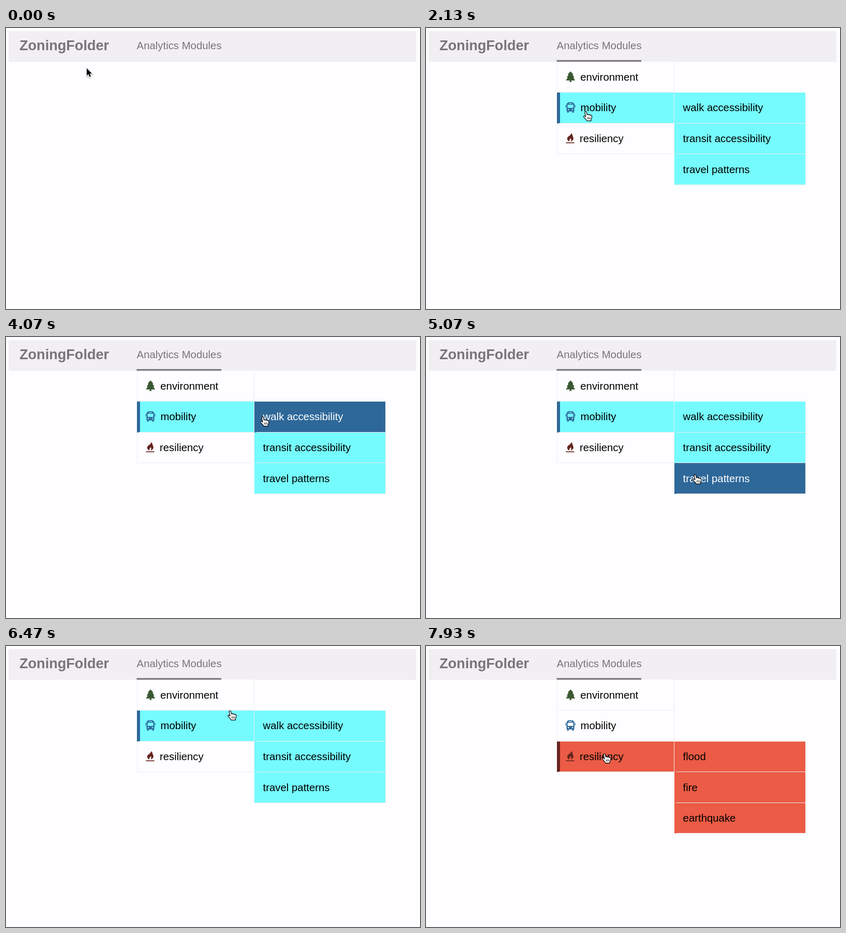
Write an HTML page with a canvas that moves like this. It is 800 px wide and 544 px high and loops after 8 s.

```html
<!DOCTYPE html>
<html lang="en">
<head>
<meta charset="utf-8">
<title>Dropdown menu</title>
<style>
html, body { margin: 0; width: 100%; height: 100%; overflow: hidden; background: #fefdff; }
canvas { display: block; }
</style>
</head>
<body>
<canvas id="stage" width="800" height="544"></canvas>
<script>
const ctx = document.getElementById('stage').getContext('2d');
const LOOP = 8000, STEP = 1000 / 15;
const FONT = '"Liberation Sans", Arial, sans-serif';
const PAGE = '#fefdff', LINE = '#eeecee', GREY = '#777579';
const COL1 = { x: 253, w: 227 }, COL2 = { x: 480, w: 254 };

const modules = [
  { name: 'environment', textX: 298.3, light: '#93e17f', dark: '#3a5831', icon: drawTree,
    subs: ['greenhouse gas', 'protected species'] },
  { name: 'mobility', textX: 298.5, light: '#75fbfd', dark: '#2e6899', icon: drawBus,
    subs: ['walk accessibility', 'transit accessibility', 'travel patterns'] },
  { name: 'resiliency', textX: 296.9, light: '#eb5b45', dark: '#67251f', icon: drawFlame,
    subs: ['flood', 'fire', 'earthquake'] }
];

// Pointer hot spot: time, x, y
const path = [
  [0, 156, 78], [330, 160, 74], [800, 290, 44], [1130, 287, 52], [1330, 284, 72],
  [1750, 300, 100], [2050, 308, 150], [2350, 312, 214], [2600, 306, 205], [2930, 301, 175],
  [3300, 330, 158], [3800, 505, 156], [4070, 496, 155], [4350, 505, 158], [4600, 515, 210],
  [4850, 520, 262], [5150, 520, 268], [5500, 510, 215], [5750, 500, 172], [6000, 491, 161],
  [6300, 440, 150], [6650, 425, 98], [7000, 500, 90], [7200, 519, 89], [7400, 450, 100],
  [7600, 370, 150], [7800, 345, 208], [7930, 345, 209], [8000, 345, 209]
];

const rowTop = i => Math.round(65.4 + 59.6 * i);
const textBase = i => 101.7 + 59.6 * i;

function pointerAt(t) {
  let i = 1;
  while (i < path.length - 1 && path[i][0] < t) i++;
  const [t0, x0, y0] = path[i - 1], [t1, x1, y1] = path[i];
  const u = Math.min(1, Math.max(0, (t - t0) / (t1 - t0)));
  const k = u * u * (3 - 2 * u);
  return { x: x0 + (x1 - x0) * k, y: y0 + (y1 - y0) * k };
}

// Hover state follows from the pointer and the previously open module
function hover(prev, p) {
  const closed = { p, open: false, mod: -1, sub: -1 };
  if (p.y < 65) {
    return p.x >= 252 && p.x <= 416 ? { p, open: true, mod: -1, sub: -1 } : closed;
  }
  if (!prev.open) return closed;
  const row = Math.floor((p.y - 65.4) / 59.6);
  if (p.x >= COL1.x && p.x < COL2.x && row < 3) {
    return { p, open: true, mod: Math.max(0, row), sub: -1 };
  }
  const sub = row - prev.mod;
  if (prev.mod >= 0 && p.x >= COL2.x && sub >= 0 && sub < modules[prev.mod].subs.length) {
    return { p, open: true, mod: prev.mod, sub };
  }
  return closed;
}

const states = [];
for (let i = 0; i < LOOP / STEP; i++) {
  states.push(hover(states[i - 1] || { open: false, mod: -1 }, pointerAt(i * STEP)));
}

function rect(x, y, w, h, color) {
  ctx.fillStyle = color;
  ctx.fillRect(x, y, w, h);
}

function text(str, x, y, color, font) {
  ctx.font = font || '20.35px ' + FONT;
  ctx.fillStyle = color;
  ctx.fillText(str, x, y);
}

function poly(points, color) {
  ctx.beginPath();
  points.forEach(([x, y]) => ctx.lineTo(x, y));
  ctx.closePath();
  ctx.fillStyle = color;
  ctx.fill();
}

function cell(col, row, fill, bar) {
  const y = rowTop(row), h = rowTop(row + 1) - y, { x, w } = col;
  rect(x, y, w, h, LINE);
  rect(x + 1, y, w - 2, h - 1, fill);
  if (bar) poly([[x, y], [x + 6, y], [x + 6, y + h - 1], [x, y + h]], bar);
}

function drawTree(color) {
  const side = [[0, 84], [5.5, 90], [3.8, 90.6], [7.3, 95.4], [5.4, 96], [9, 101.5], [1.3, 101.5], [2.2, 104.5]];
  const left = side.map(([x, y]) => [279.3 - x, y]).reverse();
  poly([...side.map(([x, y]) => [279.3 + x, y]), ...left], color);
}

function drawBus(color) {
  ctx.fillStyle = color;
  ctx.beginPath();
  ctx.roundRect(271.6, 143.8, 15, 17.6, [5, 5, 1.5, 1.5]);
  ctx.rect(276, 145.8, 6.2, 1.2);
  ctx.roundRect(273.6, 148.4, 11, 6.4, 1);
  ctx.rect(275.9 + 1.3, 158, 0, 0);
  for (const x of [275.2, 283]) {
    ctx.moveTo(x + 1.3, 158);
    ctx.arc(x, 158, 1.3, 0, Math.PI * 2);
  }
  ctx.fill('evenodd');
  for (const x of [269.8, 287.2]) rect(x, 148.8, 1.3, 5.2, color);
  for (const x of [272.8, 282.7]) rect(x, 161, 2.8, 3, color);
}

function drawFlame(color) {
  ctx.fillStyle = color;
  ctx.beginPath();
  ctx.moveTo(280.6, 203.6);
  ctx.bezierCurveTo(280.8, 208.4, 272.6, 209.6, 272.8, 214.4);
  ctx.bezierCurveTo(272.9, 217.2, 274.8, 218.7, 277.4, 219.8);
  ctx.bezierCurveTo(276, 216.6, 278.8, 215.6, 279.6, 213.2);
  ctx.bezierCurveTo(280.8, 215, 281, 217.4, 279.8, 219.8);
  ctx.bezierCurveTo(283.2, 218.2, 285.4, 216, 284.8, 212.4);
  ctx.bezierCurveTo(284.4, 210.4, 283.4, 209.4, 283.2, 208.4);
  ctx.bezierCurveTo(282.8, 206.4, 282.4, 204.8, 280.6, 203.6);
  ctx.fill();
  rect(270.4, 221.4, 16.2, 1.7, color);
}

function drawArrow() {
  ctx.beginPath();
  [[0, 0], [0, 14.2], [3.2, 11.2], [5.5, 16.6], [8, 15.5], [5.7, 10.3], [10.2, 10.3]]
    .forEach(([x, y]) => ctx.lineTo(x, y));
  ctx.closePath();
  ctx.save();
  ctx.shadowColor = 'rgba(0,0,0,.35)';
  ctx.shadowBlur = 3;
  ctx.shadowOffsetY = 1.5;
  ctx.strokeStyle = '#fff';
  ctx.lineWidth = 2;
  ctx.stroke();
  ctx.restore();
  ctx.fillStyle = '#000';
  ctx.fill();
}

function drawHand() {
  ctx.beginPath();
  ctx.moveTo(-1.9, 1.2);
  ctx.bezierCurveTo(-1.8, -0.8, 0.8, -1, 1.4, 0.8);
  ctx.lineTo(2.7, 6);
  ctx.bezierCurveTo(3.4, 4.6, 5.5, 4.8, 5.9, 6.4);
  ctx.bezierCurveTo(6.8, 5.2, 8.7, 5.6, 9, 7.2);
  ctx.bezierCurveTo(10, 6.2, 11.6, 6.8, 11.8, 8.4);
  ctx.bezierCurveTo(12.2, 11.4, 11.2, 13, 10.3, 15);
  ctx.lineTo(10.1, 17.6);
  ctx.lineTo(2, 17.6);
  ctx.bezierCurveTo(1.4, 14.8, -2.2, 12.6, -4, 10);
  ctx.bezierCurveTo(-4.8, 8.2, -2.6, 7.4, -1.2, 8.6);
  ctx.lineTo(0, 9.8);
  ctx.closePath();
  ctx.fillStyle = '#fff';
  ctx.fill();
  ctx.strokeStyle = '#000';
  ctx.lineWidth = 1.2;
  ctx.lineJoin = 'round';
  ctx.stroke();
  ctx.lineWidth = 0.9;
  ctx.beginPath();
  for (const x of [3.6, 5.9, 8.2]) {
    ctx.moveTo(x, 10.6);
    ctx.lineTo(x + 0.1, 14.6);
  }
  ctx.stroke();
}

function drawMenu({ mod, sub }) {
  modules.forEach((m, i) => {
    const on = i === mod;
    cell(COL1, i, on ? m.light : PAGE, on && m.dark);
    m.icon(m.dark);
    text(m.name, m.textX, textBase(i), '#000');
  });
  if (mod < 0) return;
  const m = modules[mod];
  m.subs.forEach((name, i) => {
    const on = i === sub, fill = on ? m.dark : m.light;
    cell(COL2, mod + i, fill, fill);
    text(name, 496.6, textBase(mod + i), on ? '#fff' : '#000');
  });
}

function draw(state) {
  rect(0, 0, 800, 544, PAGE);
  rect(5, 6, 788, 59.4, '#f1eff1');
  text('ZoningFolder', 26, 42.8, GREY, 'bold 27.1px ' + FONT);
  text('Analytics Modules', 252.6, 40.6, GREY);
  if (state.open) {
    drawMenu(state);
    rect(252.5, 62, 163.5, 3.4, '#7f7d81');
  }
  ctx.save();
  ctx.translate(state.p.x, state.p.y);
  state.open ? drawHand() : drawArrow();
  ctx.restore();
}

const start = performance.now();
function frame() {
  const t = (performance.now() - start) % LOOP;
  draw(states[Math.min(states.length - 1, Math.floor((t + 5) / STEP))]);
  requestAnimationFrame(frame);
}
frame();
</script>
</body>
</html>
```
